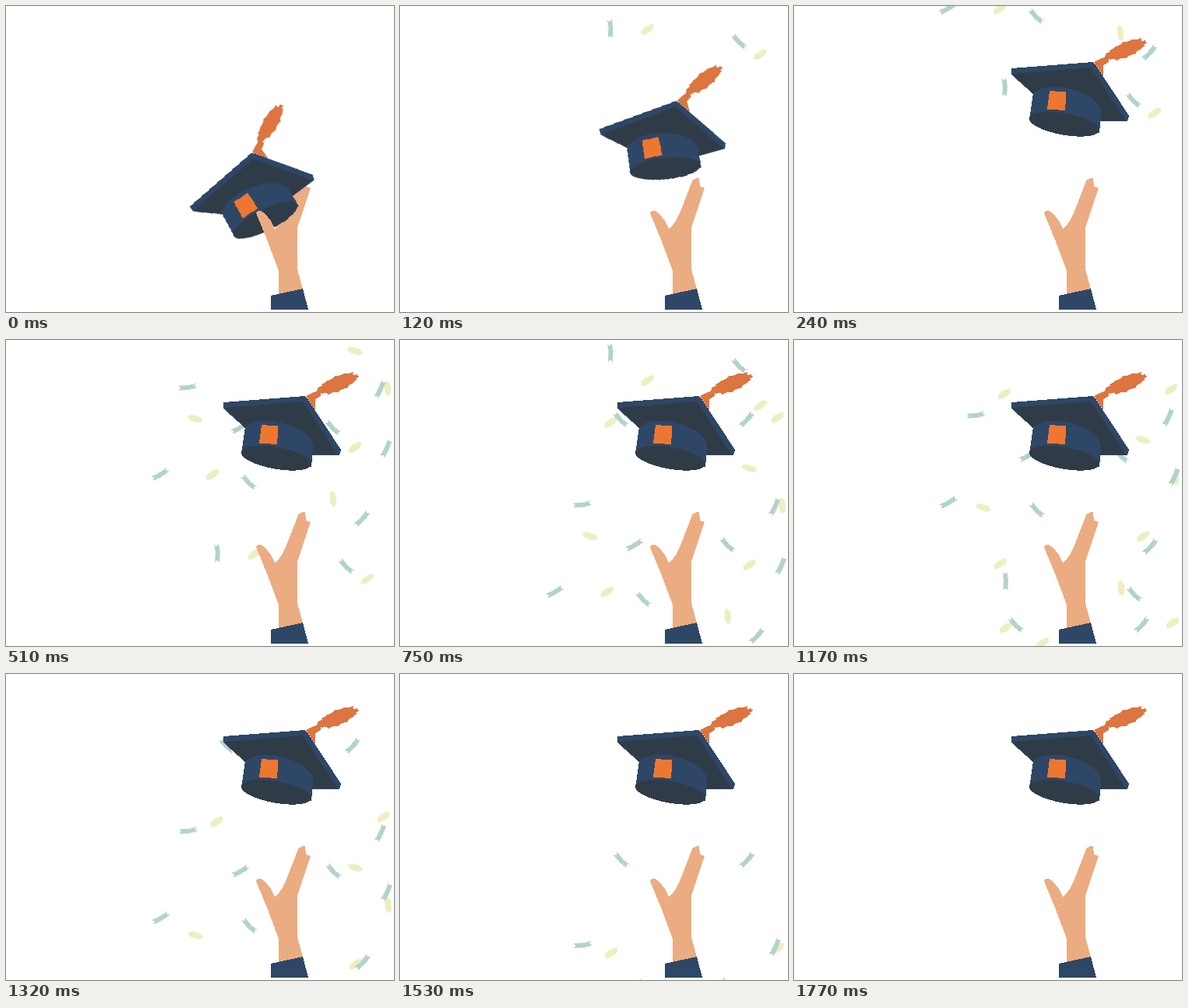
An HTML page that plays this animation: 498 px wide and 393 px high, repeating every 4500 ms.

```html
<!DOCTYPE html>
<html lang="en">
<head>
<meta charset="utf-8">
<title>Graduation cap toss</title>
<style>
  html, body { margin: 0; width: 100%; height: 100%; overflow: hidden; background: #fff; }
  svg { display: block; width: 100%; height: 100%; shape-rendering: crispEdges; }

  /* Everything advances in 30 ms ticks: 7 ticks for the toss, 59 for the confetti. */
  .cap, .fall { animation: 4500ms infinite; }
  .cap { animation-name: toss; transform-origin: 383px 73px; }
  .fall { animation-name: fall; }
  .first { --from: -2px, -320px; --to: 4px, 791px; }
  .second.ribbon { --from: -4px, -781px; --to: 2px, 455px; }
  .second.petal { --from: -4px, -825px; --to: 2px, 596px; }

  @keyframes toss {
    0% { transform: translate(-68px, 117px) rotate(-36.6deg); animation-timing-function: steps(7); }
    4.6667%, 100% { transform: translate(0, 0) rotate(0deg); }
  }
  @keyframes fall {
    0% { transform: translate(var(--from)); animation-timing-function: steps(59); }
    39.3333%, 100% { transform: translate(var(--to)); }
  }

  .ribbon { fill: #b2d3c9; }
  .petal { fill: #ecefc1; }
  .navy { fill: #2f4766; }
  .dark { fill: #2f3c48; }
  .skin { fill: #ecac81; }
  .orange { fill: #dd7540; }
</style>
</head>
<body>
<svg viewBox="0 0 498 393" preserveAspectRatio="none">
  <defs>
    <path id="ribbon" d="M-12-2Q0-1 11-4L9-1 12 2Q0 5-12 4L-9 1Z"/>
    <ellipse id="petal" rx="10" ry="4.3"/>
  </defs>

  <g id="confetti"></g>

  <path class="skin" d="M375 225Q378 221 384 221L385 232 391 234 374 284V338L381 364 350 371V340L335 300 321 266Q325 256 340 276L345 286Q354 280 361 261Z"/>
  <path class="navy" d="M340 372L381 363 388 390H340Z"/>

  <g class="cap">
    <path class="orange" d="M385 72L404 63V72L397 76V90Z"/>
    <polygon id="tassel" class="orange" transform="translate(426 56) rotate(-22)"/>
    <path class="navy" d="M279 80L383 72 386 74 430 141 428 148H393L308 114 279 88Z"/>
    <path class="dark" d="M280 87L381 79 426 147H393L308 114Z"/>
    <path class="navy" d="M302 147L307 112Q320 102 342 104C372 109 394 122 394 138L392 163Z"/>
    <ellipse class="dark" rx="46" ry="14" transform="translate(347 151.7) rotate(10)"/>
    <path fill="#ed7731" d="M328 109L349.500 110.500 348 134 325 132.500Z"/>
  </g>

  <path class="skin" d="M321 266Q325 256 340 276L345 286V300H335Z"/>
</svg>
<script>
  // Key points of one wave, grouped by tilt in degrees; both waves share them.
  const wavePoints = {
    petal: {
      '-35': [[448, 138], [265, 173], [319, 275], [464, 307], [270, -45], [484, -51]],
      18: [[448, 14], [243, 101]],
      84: [[490, 62], [420, 204]]
    },
    ribbon: {
      50: [[420, 112], [312, 182], [437, 290], [283, -49]],
      '-42': [[457, 229], [444, -49]],
      '-25': [[300, 112], [198, 172]],
      '-60': [[480, 63], [488, 139]],
      '-3': [[233, 60]],
      '-87': [[271, 274]]
    }
  };

  const layer = (kind, wave) => {
    const pieces = Object.entries(wavePoints[kind]).flatMap(([tilt, points]) =>
      points.map(([x, y]) => `<use href="#${kind}" transform="translate(${x} ${y}) rotate(${tilt})"/>`));
    return `<g class="fall ${wave} ${kind}">${pieces.join('')}</g>`;
  };

  document.getElementById('confetti').innerHTML = ['first', 'second']
    .map(wave => layer('petal', wave) + layer('ribbon', wave)).join('');

  // Ragged ellipse
  const raggedPoint = (_, i, { length }) => {
    const angle = i / length * 2 * Math.PI;
    const radius = 1 + 0.1 * Math.sin(i * i);
    return [27 * radius * Math.cos(angle), 9.5 * radius * Math.sin(angle)];
  };
  document.getElementById('tassel')
    .setAttribute('points', Array.from({ length: 40 }).map(raggedPoint).join(' '));
</script>
</body>
</html>
```
